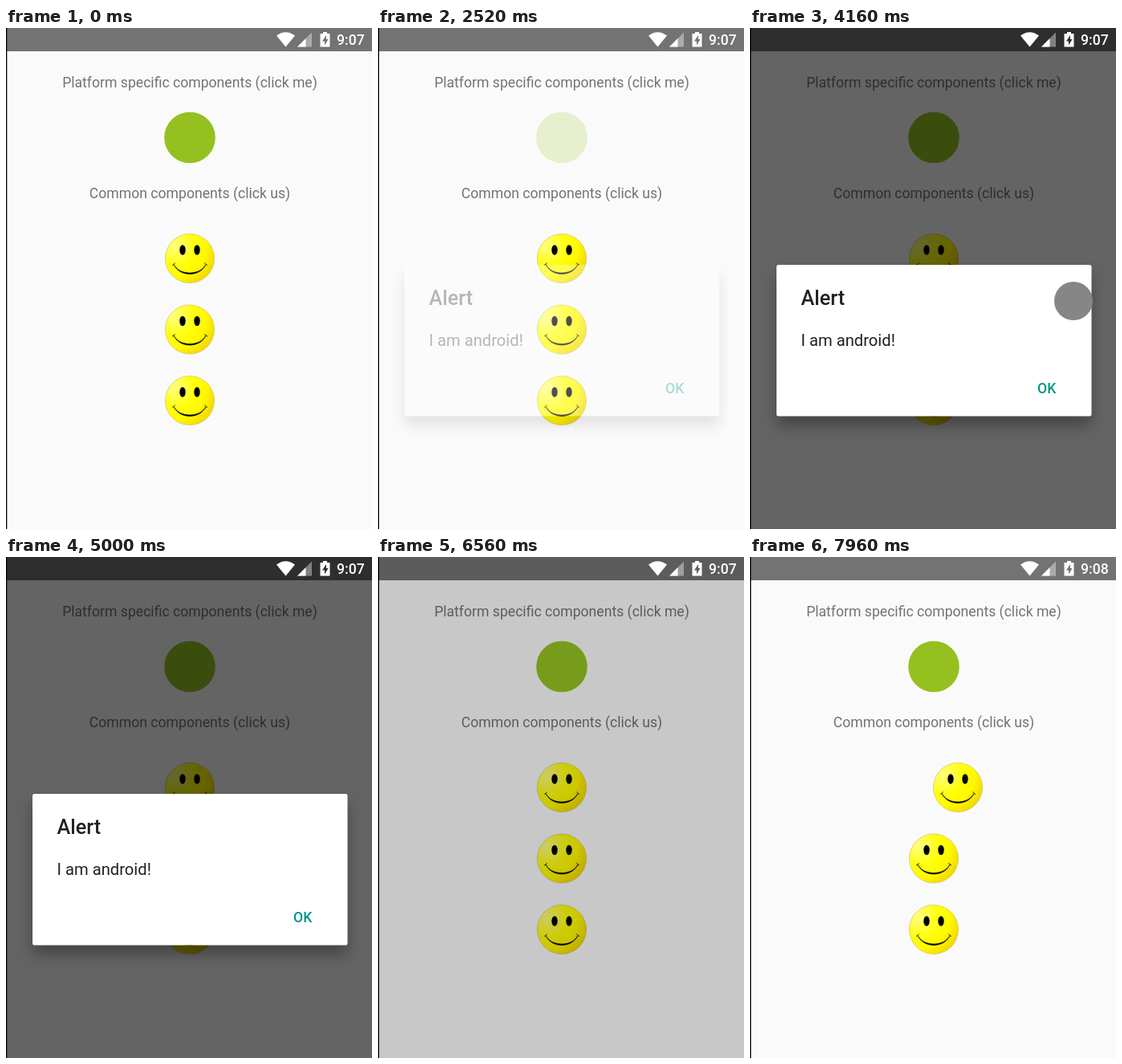
Recreate the animation shown at these times as an HTML page. Size 456x624 px, loop 8000 ms.

```html
<!DOCTYPE html>
<html lang="en">
<head>
<meta charset="utf-8">
<title>Alert demo</title>
<style>
  html, body { margin: 0; width: 100%; height: 100%; overflow: hidden; background: #fafafa; }
  svg { display: block; width: 456px; height: 624px; font: 17.62px Roboto, sans-serif; }
  .label { fill: #737373; text-anchor: middle; }
  .medium { font-weight: 500; }
  #panel { filter: drop-shadow(0 12px 9px rgba(0, 0, 0, .3)); }
</style>
</head>
<body>
<svg viewBox="0 0 456 624">
  <defs>
    <radialGradient id="skin" cx=".2" cy=".25" r=".85">
      <stop offset="0" stop-color="#ffff80"/>
      <stop offset=".5" stop-color="#ffff08"/>
      <stop offset=".75" stop-color="#fff800"/>
      <stop offset="1" stop-color="#f4dc00"/>
    </radialGradient>
    <g id="smiley">
      <circle r="30.6" fill="url(#skin)" stroke="#cdc570" stroke-width=".7"/>
      <ellipse cx="-9" cy="-10.5" rx="3.7" ry="6.2"/>
      <ellipse cx="9" cy="-10.5" rx="3.7" ry="6.2"/>
      <path d="M-20 7.500C-13 23.500 13 23.500 20 7.500C13 21.500-13 21.500-20 7.500Z" stroke="#000" stroke-width=".6"/>
      <path d="M-22 8.500Q-20 8-18.500 5.500M22 8.500Q20 8 18.500 5.500" fill="none" stroke="#000" stroke-width=".8"/>
    </g>
  </defs>

  <rect width="456" height="624" fill="#fafafa"/>
  <rect width="456" height="29" fill="#737373"/>
  <text class="label" x="229" y="74">Platform specific components (click me)</text>
  <circle id="icon" cx="229" cy="136.5" r="31.800" fill="#94c120"/>
  <text class="label" x="229" y="212">Common components (click us)</text>
  <use id="mover" href="#smiley"/>
  <use href="#smiley" x="229" y="375.5"/>
  <use href="#smiley" x="229" y="464"/>

  <rect id="dim" width="456" height="624"/>

  <g fill="#fff" transform="translate(0 -.5)">
    <path d="M337 10Q348.500 1.500 360 10L348.500 24Z"/>
    <path d="M363 24L381 6V24Z" opacity=".4"/>
    <path d="M363 24L373.500 13.500V24Z"/>
    <path fill-rule="evenodd" d="M391.500 7.500H395V5.500H400V7.500H403.500V24H391.500ZM399 9.500L394 17H397V22L401.500 14.500H399Z"/>
    <text id="clock" class="medium" x="412" y="21.500"></text>
  </g>

  <g id="dialog">
    <rect id="panel" x="33" y="295" width="392.500" height="188.500" rx="2.500" fill="#fff"/>
    <g fill="#212121">
      <text class="medium" x="63.500" y="344.500" font-size="25.200">Alert</text>
      <text x="63.500" y="396" font-size="20.200">I am android!</text>
    </g>
    <text class="medium" x="358" y="454.500" fill="#009688">OK</text>
  </g>

  <circle id="cursor" r="24" fill="#868686"/>
  <rect width="1.300" height="624"/>
</svg>
<script>
  const LOOP = 8000, STEP = 40;
  const $ = id => document.getElementById(id);
  const [icon, mover, dim, clock, dialog, cursor] =
    ["icon", "mover", "dim", "clock", "dialog", "cursor"].map($);

  // Each pass of the pointer: [time, x, y]; it hides while pressing.
  const passes = [
    [[720, 472, 255], [1520, 327, 189], [1800, 236, 142]],
    [[4160, 403, 340], [4760, 376, 457], [4960, 370, 445]],
    [[6720, 370, 445], [7120, 357, 279], [7440, 234, 284]]
  ];

  const ramp = (t, from, to) => Math.min(1, Math.max(0, (t - from) / (to - from)));
  const mix = (a, b, p) => a + (b - a) * p;
  const easeOut = p => 1 - (1 - p) ** 2;

  function placeCursor(t) {
    const pass = passes.find(p => t >= p[0][0] && t <= p[2][0]);
    cursor.style.display = pass ? "" : "none";
    if (!pass) return;
    const [a, b] = t < pass[1][0] ? pass : pass.slice(1);
    const p = ramp(t, a[0], b[0]);
    cursor.setAttribute("cx", mix(a[1], b[1], p));
    cursor.setAttribute("cy", mix(a[2], b[2], p));
  }

  function draw(t) {
    const pressed = ramp(t, 1840, 2000) - ramp(t, 2520, 2720);
    icon.setAttribute("opacity", 1 - .8 * pressed);
    dialog.setAttribute("opacity", easeOut(ramp(t, 2480, 2720)) - ramp(t, 6320, 6540));
    dim.setAttribute("opacity", .6 * (ramp(t, 2520, 2760) - ramp(t, 6400, 6640)));
    const shift = 30 * ramp(t, 7760, 7960) ** 2;
    mover.setAttribute("transform", `translate(${229 + shift} 287)`);
    clock.textContent = t < 7600 ? "9:07" : "9:08";
    placeCursor(t);
  }

  const start = performance.now();
  function tick() {
    const t = (performance.now() - start) % LOOP;
    draw(Math.floor(t / STEP) * STEP);
    requestAnimationFrame(tick);
  }
  tick();
</script>
</body>
</html>
```
